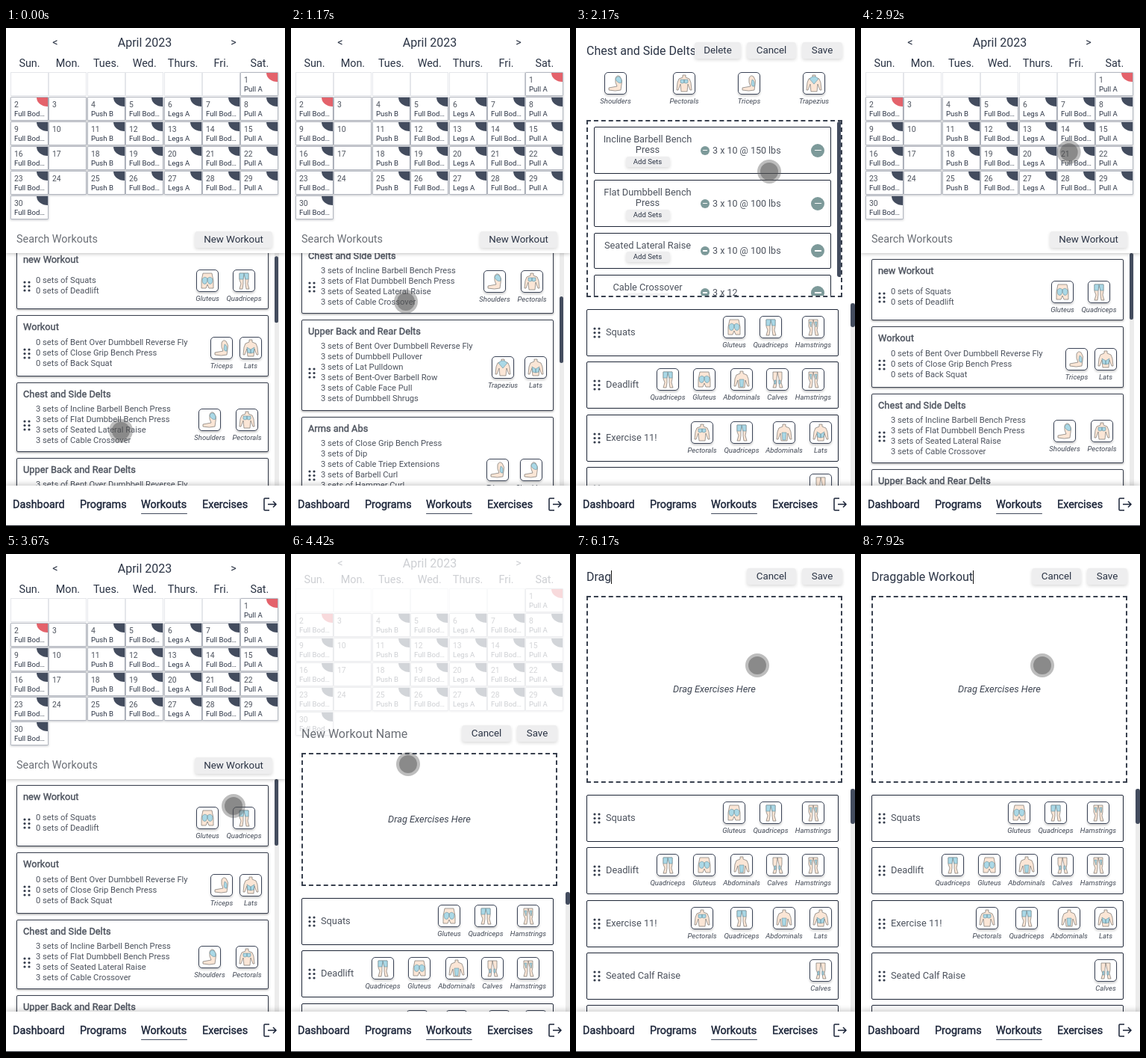
Write an HTML page that moves like this. It is 374 px wide and 666 px high and loops after 8000 ms.

```html
<!DOCTYPE html>
<html lang="en">
<head>
<meta charset="utf-8">
<title>Workout planner</title>
<style>
html, body { margin: 0; width: 100%; height: 100%; overflow: hidden; background: #fff; }
#stage { position: relative; width: 374px; height: 666px; overflow: hidden; background: #fff; font-family: Roboto, sans-serif; color: #2b3445; }
#stage div, #stage svg { position: absolute; box-sizing: border-box; }
.view { left: 0; top: 0; width: 374px; height: 612px; overflow: hidden; }
.text { line-height: 20px; height: 20px; white-space: pre; }
.bold { -webkit-text-stroke: .4px currentColor; }
.soft { color: #4d535e; }
.hint { color: #6b6f76; }
.italic { font-style: italic; color: #3f4653; }
.card { border: 1px solid #1d2536; border-radius: 2px; background: #fff; }
.raised { border-color: #3a4150; box-shadow: 0 1px 3px rgba(0,0,0,.4); }
.cell { border: 1px solid #e4e6ea; background: #fff; overflow: hidden; }
.dated { border-color: #b4b8c1; border-radius: 1px; box-shadow: 0 1px 3px rgba(40,45,60,.28); }
.corner { border-radius: 0 0 0 100%; background: #434c5e; }
.button { border-radius: 4px; background: #eeeeef; box-shadow: 0 2px 4px rgba(0,0,0,.14); }
.icon { border: 1px solid #3c4558; border-radius: 5px; background: #fff; box-shadow: 0 2px 3px rgba(0,0,0,.2); }
.bar { background: #434c5e; border-radius: 3px; }
.track { background: #ececec; }
.dashed { border: 2px dashed #39414f; overflow: hidden; }
.minus { border-radius: 50%; background: #7d9a9a; }
.minus::after { content: ""; position: absolute; left: 25%; right: 25%; top: calc(50% - .75px); height: 1.5px; background: #fff; }
#caret { display: inline-block; width: 1px; height: 18px; margin-right: -1px; background: #111; vertical-align: -4px; }
#panel { left: 0; top: 0; width: 374px; height: 301px; background: #fff; box-shadow: 0 1px 5px rgba(0,0,0,.25); }
#nav { left: 0; top: 612px; width: 374px; height: 54px; background: #fff; color: #1b2438; box-shadow: 0 -2px 7px rgba(0,0,0,.2); border-bottom: 1px solid #30343c; }
#cursor { left: -16px; top: -16px; width: 32px; height: 32px; border-radius: 50%; background: rgba(90,90,90,.4); }
#cursor::after { content: ""; position: absolute; inset: 4px; border-radius: 50%; background: rgba(75,75,75,.45); }
</style>
</head>
<body>
<div id="stage"></div>
<script>
const LOOP = 8000, NAV_TOP = 612, COLLAPSE = 252;
const $ = id => document.getElementById(id);

// --- building blocks; text is placed by its vertical centre ---
const textTop = (y, size) => y - (size > 14 ? 9 : 10);
const rect = (x, y, w, h, cls, inner = '', id = '') =>
  `<div ${id && `id="${id}"`} class="${cls}" style="left:${x}px;top:${y}px;width:${w}px;height:${h}px">${inner}</div>`;
const text = (x, y, str, size, cls = '') =>
  `<div class="text ${cls}" style="left:${x}px;top:${textTop(y, size)}px;font-size:${size}px">${str}</div>`;
const centred = (x, y, str, size, cls = '') =>
  `<div class="text ${cls}" style="left:${x - 100}px;top:${textTop(y, size)}px;width:200px;text-align:center;font-size:${size}px">${str}</div>`;
const button = (x, y, w, str) =>
  rect(x, y - 11, w, 22, 'button') + centred(x + w / 2, y, str, 13.333);
const minus = (x, y, r) => rect(x - r, y - r, 2 * r, 2 * r, 'minus');

function grip(y) {
  let dots = '';
  for (let i = 0; i < 6; i++)
    dots += `<circle cx="${2 + i % 2 * 6}" cy="${2 + (i >> 1) * 5.5}" r="1.6"/>`;
  return `<svg style="left:23px;top:${y - 7.5}px" width="10" height="15" fill="#343c4c">${dots}</svg>`;
}

// --- muscle icons ---
const skin = d => `<path d="${d}" fill="#fbe6d6" stroke="#77736f" stroke-width=".7"/>`;
const blue = d => `<path d="${d}" fill="#aad8e6" stroke="#6b8f9b" stroke-width=".6"/>`;
const torso = skin('M12 3h4v3l5 2 2 5 1 10h-2l-3-8-1 10h-8L9 15l-3 8H4l1-10 2-5 5-2z');
const legs = skin('M8 4h6l-1 9v5l-1 7H8l2-7-2-5zM14 4h6v9l-1 5 2 7h-4l-1-7v-5z');
const arm = skin('M14 7q2-5 6-2 4 5 2 11l-1 7q-7 2-16 0v-3l11-2q-3-5-2-11z');
const figures = {
  Pectorals: torso + blue('M9 9h5v4q-3 2-5 0zM14 9h5v4q-3 2-5 0z'),
  Abdominals: torso + blue('M11 14h6l-1 10h-4z'),
  Lats: torso + blue('M9 13l5 3v5l-4-1zM19 13l-5 3v5l4-1z'),
  Trapezius: torso + blue('M12 5h4l4 3-6 7-6-7z'),
  Quadriceps: legs + blue('M8 4h6l-1 8H8zM14 4h6v8h-4z'),
  Hamstrings: legs + blue('M9 7h3l-1 7zM16 7h3l-1 7z'),
  Calves: legs + blue('M10 15h2v5h-2zM16 15h2v5h-2z'),
  Gluteus: skin('M8 4h12l2 10v10h-6l-2-5-2 5H6V14z') +
    blue('M14 11q-4-4-7 1 0 8 5 6 2-2 2-7zM14 11q4-4 7 1 0 8-5 6-2-2-2-7z'),
  Triceps: arm + blue('M18 9q4 1 3 9-3 1-4-3z'),
  Shoulders: arm + blue('M14 9q1-5 5-4 4 3 3 8-4 2-8-4z')
};
const muscle = ([name, x], y) =>
  rect(x - 15, y - 15, 30, 30, 'icon', `<svg width="28" height="28">${figures[name]}</svg>`) +
  centred(x, y + 24, name, 9.6, 'italic');

// --- calendar ---
function calendar() {
  const plan = ['Full Bod…', '', 'Push B', 'Full Bod…', 'Legs A', 'Full Bod…', 'Pull A'];
  const month = centred(186, 19, 'April 2023', 16) + centred(66, 19, '&lt;', 14.4) + centred(305, 19, '&gt;', 14.4);
  let grid = '';
  ['Sun.', 'Mon.', 'Tues.', 'Wed.', 'Thurs.', 'Fri.', 'Sat.'].forEach((name, col) =>
    grid += centred(31.5 + col * 51.4, 47, name, 14.4));
  for (let i = 0; i <= 35; i++) {
    const col = i % 7, day = i - 5;
    let inner = '';
    if (day > 0) {
      inner = text(4, 9.5, day, 10.4, 'soft') + text(4, 21.5, plan[col], 9.6);
      if (plan[col]) inner += `<div class="corner" style="right:0;top:0;width:15px;height:12px${day < 3 ? ';background:#e4626b' : ''}"></div>`;
    }
    grid += rect(Math.round(6 + col * 51.4), Math.round(59 + (i / 7 | 0) * 32.9), 51, 32, day > 0 ? 'cell dated' : 'cell', inner);
  }
  return rect(0, 0, 374, 260, '', rect(0, 0, 374, 40, '', month, 'month') + grid, 'calendar');
}

// --- workout list ---
const workouts = [
  ['new Workout', 0, ['Squats', 'Deadlift'], [['Gluteus', 270], ['Quadriceps', 319]]],
  ['Workout', 0, ['Bent Over Dumbbell Reverse Fly', 'Close Grip Bench Press', 'Back Squat'], [['Triceps', 289], ['Lats', 328]]],
  ['Chest and Side Delts', 3, ['Incline Barbell Bench Press', 'Flat Dumbbell Bench Press', 'Seated Lateral Raise', 'Cable Crossover'],
    [['Shoulders', 273], ['Pectorals', 323]]],
  ['Upper Back and Rear Delts', 3, ['Bent Over Dumbbell Reverse Fly', 'Dumbbell Pullover', 'Lat Pulldown', 'Bent-Over Barbell Row', 'Cable Face Pull', 'Dumbbell Shrugs'],
    [['Trapezius', 284], ['Lats', 328]]],
  ['Arms and Abs', 3, ['Close Grip Bench Press', 'Dip', 'Cable Triep Extensions', 'Barbell Curl', 'Hammer Curl', 'Crunches', 'Leg Raise'],
    [['Triceps', 277], ['Shoulders', 322]]]
];
function workoutCards() {
  let top = 309, html = '';
  for (const [title, sets, moves, muscles] of workouts) {
    const height = Math.max(82, Math.round(36 + 14.3 * moves.length));
    const mid = top + Math.round((height + 20) / 2);
    html += rect(14, top, 338, height, 'card raised') + text(23, top + 16, title, 12.8, 'bold soft') + grip(mid);
    moves.forEach((move, i) =>
      html += text(40, mid + 14 * (i - (moves.length - 1) / 2), `${sets} sets of ${move}`, 11.2, 'soft'));
    html += muscles.map(m => muscle(m, mid - 7)).join('');
    top += height + 8;
  }
  return html;
}

// --- editors ---
const exercises = [
  ['Squats', [['Gluteus', 212], ['Quadriceps', 261], ['Hamstrings', 318]]],
  ['Deadlift', [['Quadriceps', 123], ['Gluteus', 172], ['Abdominals', 222], ['Calves', 270], ['Hamstrings', 318]]],
  ['Exercise 11!', [['Pectorals', 169], ['Quadriceps', 222], ['Abdominals', 279], ['Lats', 328]]],
  ['Seated Calf Raise', [['Calves', 328]]],
  ['Lunges', [['Quadriceps', 319]]]
];
const exerciseCards = exercises.map(([name, muscles], i) => {
  const top = Math.round(8 + i * 70.3);
  return rect(14, top, 338, 63, 'card') + grip(top + 31) + text(40, top + 31, name, 12.8, 'soft') +
    muscles.map(m => muscle(m, top + 24)).join('');
}).join('');

function setCards() {
  const rows = [
    [7, 63, ['Incline Barbell Bench', 'Press'], '3 x 10 @ 150 lbs'],
    [78, 63, ['Flat Dumbbell Bench', 'Press'], '3 x 10 @ 100 lbs'],
    [149, 48, ['Seated Lateral Raise'], '3 x 10 @ 100 lbs'],
    [205, 48, ['Cable Crossover'], '3 x 12']
  ];
  return rows.map(([top, height, names, sets]) => {
    const mid = top + height / 2, add = top + height - 16;
    return rect(8, top, 318, height, 'card') +
      names.map((name, i) => centred(80, top + 16.5 + 14.5 * i, name, 12.8, 'soft')).join('') +
      rect(51, add - 7, 59, 14, 'button') + centred(80, add, 'Add Sets', 9.6) +
      minus(157, mid, 6) + text(167, mid, sets, 12.5, 'soft') + minus(308, mid, 9);
  }).join('') + rect(334, 0, 6, 208, 'bar');
}

const editor = (id, head, box) => rect(0, 0, 374, NAV_TOP, 'view',
  rect(0, 0, 374, 120, '', head, id + 'Head') +
  rect(14, 0, 343, 0, 'dashed', box, id + 'Box') +
  rect(0, 0, 374, 0, 'view', exerciseCards + rect(368, 0, 6, 400, 'track') + rect(368, 0, 6, 40, 'bar', '', id + 'Thumb'), id + 'List'), id);
const actions = button(229, 30, 66, 'Cancel') + button(303, 30, 54, 'Save');

const nav = [['Dashboard', 9], ['Programs', 99], ['Workouts', 181], ['Exercises', 263]]
  .map(([name, x]) => text(x, 25, name, 14.4, 'bold')).join('') + rect(181, 37, 62, 1, 'bar') +
  '<svg style="left:344px;top:15px" width="20" height="20" fill="none" stroke="#1b2438" stroke-width="1.5"><path d="M9 2H3q-1 0-1 1v14q0 1 1 1h6M7 10h11M14 6l4 4-4 4"/></svg>';

$('stage').innerHTML =
  rect(0, 0, 374, NAV_TOP, 'view',
    rect(0, 0, 374, 900, '', workoutCards(), 'cards') +
    rect(360, 301, 6, 311, 'track', '', 'listTrack') + rect(360, 301, 5, 89, 'bar', '', 'listThumb') +
    rect(0, 0, 374, 301, '', text(14, 282, 'Search Workouts', 14.4, 'hint') + button(253, 283, 104, 'New Workout'), 'panel'), 'browse') +
  calendar() +
  editor('chest', text(14, 30, 'Chest and Side Delts', 16) + button(159, 30, 62, 'Delete') + actions +
    [['Shoulders', 53], ['Pectorals', 145], ['Triceps', 232], ['Trapezius', 319]].map(m => muscle(m, 74)).join(''), setCards()) +
  editor('fresh', text(14, 30, '<span id="typed"></span><i id="caret"></i><span id="holder" class="hint">New Workout Name</span>', 16) + actions,
    `<div class="text italic" style="left:0;top:calc(50% - 10px);width:100%;text-align:center;font-size:12.8px">Drag Exercises Here</div>`) +
  rect(0, NAV_TOP, 374, 54, '', nav, 'nav') +
  '<div id="cursor"></div>';

// --- timeline: rows of [time, ...values], eased between rows ---
const inOut = u => u < .5 ? 4 * u ** 3 : 1 - 4 * (1 - u) ** 3;
const smooth = u => u * u * (3 - 2 * u);
const linear = u => u;
const outQuad = u => u * (2 - u);
function track(rows, t, ease) {
  const i = rows.findIndex(row => row[0] > t);
  if (i < 0) return rows[rows.length - 1].slice(1);
  if (!i) return rows[0].slice(1);
  const a = rows[i - 1], b = rows[i], k = ease((t - a[0]) / (b[0] - a[0]));
  return a.slice(1).map((v, j) => v + (b[j + 1] - v) * k);
}
const path = [[1080, 154, 366], [1700, 154, 366], [2170, 259, 192], [2480, 262, 30], [2650, 262, 30], [3250, 301, 348],
  [3670, 305, 337], [3840, 305, 283], [4020, 305, 283], [4380, 157, 281], [4750, 157, 281], [5250, 243, 149]];
const collapse = [[1420, 0], [1680, 1], [2620, 1], [2900, 0], [4331, 0], [4590, 1]];
const fade = [[1380, 1], [1640, 0], [2620, 0], [2900, 1], [4190, 1], [4490, 0]];
const NAME = 'Draggable Workout', TYPE_START = 5750, TYPE_STEP = 120;

const shift = (id, x, y) => $(id).style.transform = `translate(${x}px,${y}px)`;
const show = (id, on) => $(id).style.display = on ? '' : 'none';
const span = (id, top, height) => Object.assign($(id).style, { top: top + 'px', height: height + 'px' });

function layOut(id, boxTop, boxHeight, p) {
  const drop = Math.round(COLLAPSE * (1 - p)), top = boxTop + drop;
  const height = boxHeight - Math.round(86 * (1 - p));
  const listTop = top + height + 8, room = NAV_TOP - listTop;
  shift(id + 'Head', 0, drop);
  span(id + 'Box', top, height);
  span(id + 'List', listTop, room);
  span(id + 'Thumb', 0, Math.max(17, room * room / 1890));
}

function draw(t) {
  const [p] = track(collapse, t, inOut), [alpha] = track(fade, t, linear);
  const mode = t >= 4080 ? 'fresh' : t >= 1380 && t < 2600 ? 'chest' : 'browse';
  for (const id of ['browse', 'chest', 'fresh']) show(id, id === mode);

  $('calendar').style.opacity = alpha;
  shift('calendar', 0, Math.round(-78 * p));
  shift('month', 0, Math.round(36 * p));

  const pull = outQuad(Math.min(1, t / 1080));
  const scroll = t < 2600 ? Math.round(15 + 185 * pull) : 0, lift = Math.round(-COLLAPSE * p);
  shift('cards', 0, lift - scroll);
  shift('panel', 0, lift);
  span('listTrack', 301 + lift, 311 - lift);
  shift('listThumb', 0, lift + scroll * .29);

  if (mode === 'chest') layOut('chest', 123, 237, p);
  if (mode === 'fresh') layOut('fresh', 56, 250, p);

  const count = Math.max(0, Math.min(NAME.length, Math.floor((t - TYPE_START) / TYPE_STEP) + 1));
  $('typed').textContent = NAME.slice(0, count);
  show('holder', !count);
  $('caret').style.visibility = count || (t > 4600 && (t - 4600) % 1000 < 500) ? 'visible' : 'hidden';

  const [x, y] = t < 1080 ? [154, 539 - 173 * pull] : track(path, t, smooth);
  shift('cursor', x, y);
}

const start = performance.now();
function tick() {
  draw((performance.now() - start) % LOOP);
  requestAnimationFrame(tick);
}
tick();
</script>
</body>
</html>
```
